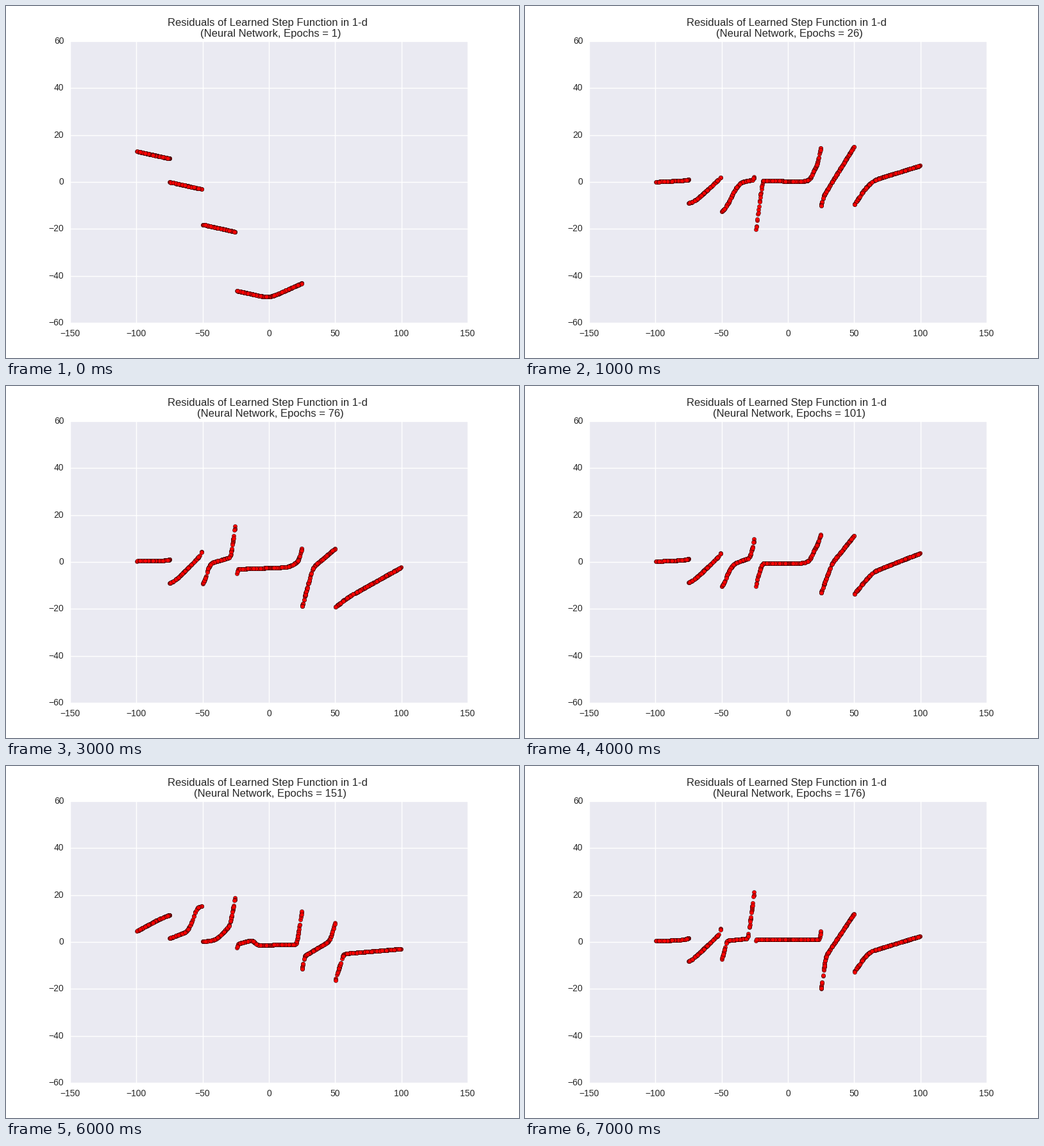
Write a matplotlib script that moves like this. It is 800 by 550 pixels and loops after 8000 ms.

```python
import numpy as np
import matplotlib.pyplot as plt
from matplotlib.animation import FuncAnimation

plt.rcParams["font.family"] = "Liberation Sans"

INK = "#262626"
W, H, DPI = 800, 550, 100

# True step function: each edge lifts the level.
EDGES = [-75, -50, -25, 25, 50]
LEVELS = np.array([0, 10, 25, 50, 75, 100])

# Corners (x, prediction) of the fitted curve, by epoch.
CORNERS = {
    1: [(-100, 13.1), (0, 0.6), (100, 25.7)],
    51: [(-100, 0), (-70, 0.4), (-43.5, 14.8), (-36, 24.9), (-24, 25),
         (-19, 49.8), (20, 48.8), (22, 50.5), (26.5, 67.8), (57, 94.7),
         (100, 104.2)],
    76: [(-100, 0.4), (-73, 0.7), (-51, 13.2), (-44.5, 24.5), (-29, 27),
         (-23.7, 47), (16, 47.8), (22.3, 50.3), (33, 72.7), (58, 84.5),
         (100, 97.8)],
    126: [(-100, 0.1), (-74, 1.2), (-47, 14.8), (-40.5, 23.9), (-26, 27),
          (-19.6, 51.6), (13, 51.2), (16.5, 53), (20, 61.5), (26, 69.4),
          (64.2, 105.2), (100, 109.8)],
    151: [(-100, 4.5), (-83, 9.8), (-61, 14.6), (-54, 25.1), (-40, 25.6),
          (-29.5, 32), (-23.7, 49.2), (-12, 51), (-10, 48.6), (20.8, 49),
          (26.6, 69), (46, 75.5), (56, 95), (100, 97.1)],
    176: [(-100, 0.4), (-75, 1), (-51.5, 13.5), (-46.5, 25.6), (-30.2, 26.5),
          (-24.3, 51.2), (24, 51), (28.5, 69), (60, 95.6), (100, 102.5)],
}


def predict(epoch, x):
    """Straight pieces joined by soft hinges; sharper turns round off less."""
    kx, ky = np.array(CORNERS[epoch], dtype=float).T
    slopes = np.diff(ky) / np.diff(kx)
    y = ky[0] + slopes[0] * (x - kx[0])
    for corner, turn in zip(kx[1:-1], np.diff(slopes)):
        soft = np.clip(1.2 / abs(turn), 0.25, 2)
        y += turn * soft * np.logaddexp(0, (x - corner) / soft)
    return y


xs = np.random.RandomState(4).uniform(-99.7, 99.9, 1000)
xs = xs[abs(xs + 25) > 0.45]
steps = LEVELS[np.searchsorted(EDGES, xs)]

fits = {epoch: predict(epoch, xs) for epoch in CORNERS}
fits[26] = (fits[51] + fits[126]) / 2
fits[101] = (fits[76] + fits[126]) / 2

fig = plt.figure(figsize=(W / DPI, H / DPI), dpi=DPI, facecolor="white")
ax = fig.add_axes([0.125, 0.1, 0.775, 0.8], facecolor="#EAEAF2")
ax.set(xlim=(-150, 150), ylim=(-60, 60),
       xticks=range(-150, 151, 50), yticks=range(-60, 61, 20))
ax.set_axisbelow(True)
ax.grid(True, color="white", linewidth=1, linestyle="-")
ax.tick_params(length=0, pad=7, labelsize=10, labelcolor=INK)
ax.spines[:].set_visible(False)
for label in ax.get_yticklabels():
    label.set_va("center")


def title_line(x, baseline, text):
    return fig.text(x / W, 1 - baseline / H, text, fontsize=12, color=INK,
                    ha="center", va="baseline")


title_line(408, 31, "Residuals of Learned Step Function in 1-d")
subtitle = title_line(412.3, 48, "")
dots = ax.scatter(xs, xs, s=20, c="red", edgecolors="black", linewidths=0.3)


def update(i):
    epoch = 1 + 25 * i
    dots.set_offsets(np.column_stack([xs, fits[epoch] - steps]))
    subtitle.set_text(f"(Neural Network, Epochs = {epoch})")
    return dots, subtitle


anim = FuncAnimation(fig, update, frames=len(fits), interval=1000,
                     repeat=True, repeat_delay=0)
plt.show()
```
